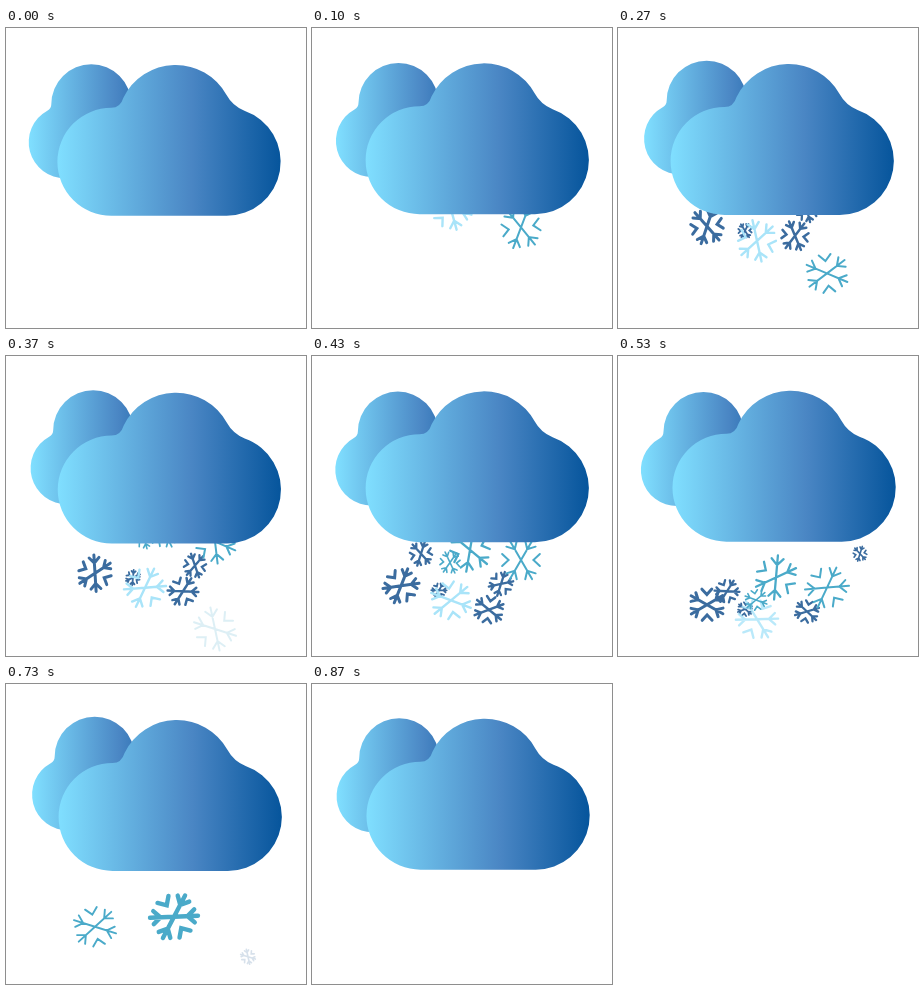
Recreate the animation shown at these times as an HTML page with a canvas. Size 300 px wide and 300 px high, loop 1.01 s.

```html
<!DOCTYPE html>
<html lang="en">
<head>
<meta charset="utf-8">
<title>Snow cloud</title>
<style>
  html, body { margin: 0; width: 100%; height: 100%; overflow: hidden; background: #fff; }
  canvas { display: block; width: 300px; height: 300px; }
</style>
</head>
<body>
<canvas id="stage" width="300" height="300"></canvas>
<script>
const ctx = document.getElementById('stage').getContext('2d');
const LOOP = 1010, STEP = 100 / 3, LAST = 26;
const DARK = '#3b6c9f', PALE = '#a9e4f9', TEAL = '#4aaac9';
const UPRIGHT = 204; // height at which every flake stands upright

const front = new Path2D('M105 187A54 54 0 0 1 105 79Q114 79 117 69A58 58 0 0 1 220 66Q226 77 238 82A54 54 0 0 1 220 187Z');
const back = new Path2D('M59 151A36 36 0 0 1 41 83.5Q45 81 45 77A40 40 0 0 1 125 77L120 151Z');

// Flakes grouped by fall per step: [color, line width, radius, x, step when upright]
const waves = [
  { fall: 6.3, flakes: [[DARK, 3, 19, 89, 8.9], [DARK, 1.8, 8, 127, 8.2], [PALE, 2.4, 22, 139, 6.6]] },
  { fall: 9.2, flakes: [[DARK, 2.5, 16, 177, 7.6], [DARK, 2.3, 13, 189, 10.4], [TEAL, 2, 23, 209, 3.5],
                        [TEAL, 2, 23, 209, 13], [TEAL, 2.3, 23, 158, 14.1]] },
  { fall: 12.5, flakes: [[TEAL, 1.6, 12, 138, 12.8], [DARK, 2.3, 13, 109, 13.5], [DARK, 1.6, 8, 242, 16.5],
                         [TEAL, 1.9, 23, 89, 18.9], [TEAL, 4.4, 25, 168, 19.7]] }
];

const clamp = v => Math.max(0, Math.min(1, v));
const wave = (k, period) => Math.cos(2 * Math.PI * k / period);

function drawCloud(path, x0, x1, dx, dy) {
  const fill = ctx.createLinearGradient(x0, 0, x1, 0);
  fill.addColorStop(0, '#80dfff');
  fill.addColorStop(0.6, '#4a86c4');
  fill.addColorStop(1, '#06559c');
  ctx.save();
  ctx.translate(dx, dy);
  ctx.fillStyle = fill;
  ctx.fill(path);
  ctx.restore();
}

function drawFlake(color, width, r, x, drop) {
  const y = UPRIGHT + drop;
  const size = clamp((y - 160) / 20), alpha = clamp((276 - y) / 16);
  if (!size || !alpha) return;
  ctx.save();
  ctx.translate(x, y);
  ctx.rotate(2 * drop * Math.PI / 180);
  ctx.scale(size, size);
  ctx.globalAlpha = alpha;
  ctx.strokeStyle = color;
  ctx.lineWidth = width;
  ctx.lineCap = 'round';
  ctx.beginPath();
  // Chevrons on every arm; the level axis has no stem
  for (let i = 0; i < 6; i++) {
    if (i % 3) {
      ctx.moveTo(0, 0);
      ctx.lineTo(r * 0.96, 0);
    }
    ctx.moveTo(r * 0.82, -r * 0.26);
    ctx.lineTo(r * 0.54, 0);
    ctx.lineTo(r * 0.82, r * 0.26);
    ctx.rotate(Math.PI / 3);
  }
  ctx.stroke();
  ctx.restore();
}

function draw(now) {
  const t = Math.floor(now % LOOP / 10) * 10;
  const k = Math.min(LAST, Math.floor((t + 4) / STEP));
  const slow = wave(k, 15), quick = wave(k, 10);
  ctx.clearRect(0, 0, 300, 300);
  drawCloud(back, 23, 168, 2 - 1.7 * slow, -2.6 + 1.8 * slow);
  for (const { fall, flakes } of waves)
    for (const [color, width, r, x, at] of flakes)
      drawFlake(color, width, r, x, (k - at) * fall);
  drawCloud(front, 51, 274, 2.1 - 1.7 * quick, -0.4 + 1.2 * quick);
}

const start = performance.now();
function tick() {
  draw(performance.now() - start);
  requestAnimationFrame(tick);
}
tick();
</script>
</body>
</html>
```
